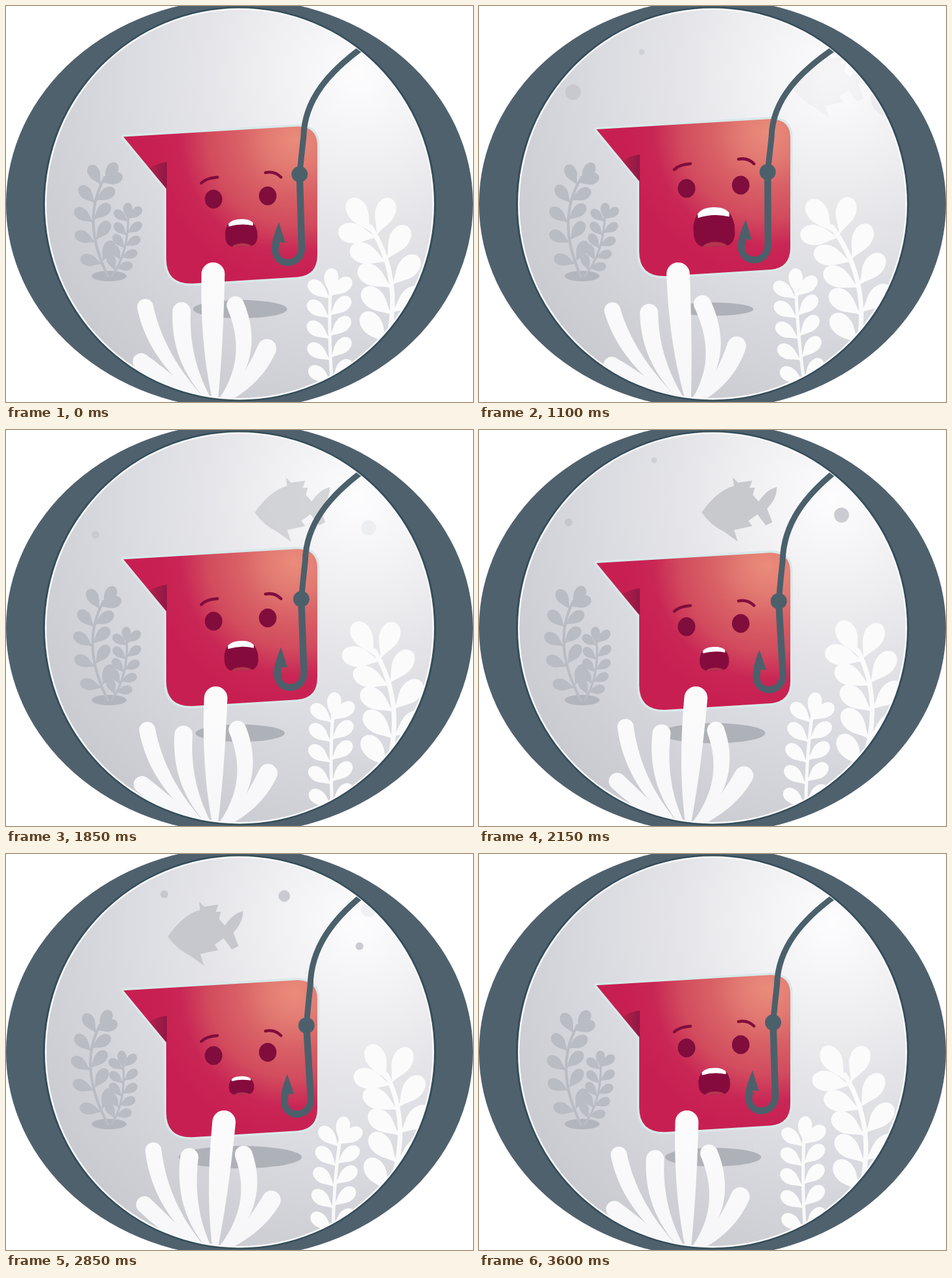
An HTML page with a canvas for the animation above (3.65 s loop, 720 by 610 pixels).

```html
<!DOCTYPE html>
<html lang="en">
<head>
<meta charset="utf-8">
<title>Hooked</title>
<style>
  html, body { margin: 0; width: 100%; height: 100%; overflow: hidden; background: #fff; }
  canvas { display: block; width: 720px; height: 610px; }
</style>
</head>
<body>
<canvas id="stage" width="720" height="610"></canvas>
<script>
const ctx = document.getElementById('stage').getContext('2d');
const LOOP = 3650, STEP = 50;
const SLATE = '#4f616d', HOOK = '#4b606b', WEED = '#b9bcc3', PLUM = '#800d3c';

const clamp = x => Math.max(0, Math.min(1, x));
const mix = (a, b, u) => a + (b - a) * u;
const quad = (a, b, c, u) => mix(mix(a, b, u), mix(b, c, u), u);

// Eases between 1 at time high and 0 at time low, around the loop
function swing(t, high, low, power) {
  const since = (t - high + LOOP) % LOOP, fall = (low - high + LOOP) % LOOP;
  const turn = since < fall ? since / fall : 1 + (since - fall) / (LOOP - fall);
  return ((1 + Math.cos(Math.PI * turn)) / 2) ** power;
}

function fill(path, color) {
  ctx.fillStyle = color;
  ctx.fill(typeof path === 'string' ? new Path2D(path) : path);
}

function line(d, width, color) {
  ctx.lineWidth = width;
  ctx.strokeStyle = color;
  ctx.stroke(new Path2D(d));
}

function oval(x, y, rx, ry, color) {
  ctx.beginPath();
  ctx.ellipse(x, y, rx, ry, 0, 0, 7);
  ctx.fillStyle = color;
  ctx.fill();
}

function spread(gradient, ...colors) {
  colors.forEach((c, i) => gradient.addColorStop(i / (colors.length - 1), c));
  return gradient;
}

const radial = (x, y, r, ...colors) => spread(ctx.createRadialGradient(x, y, 0, x, y, r), ...colors);

const PALE = spread(ctx.createLinearGradient(0, 420, 0, 600), '#fbfbfc', '#f7f7f9');

function group(draw) {
  ctx.save();
  draw();
  ctx.restore();
}

// Drop-shaped leaf, narrow at (x, y) and round at its tip; angle 0 points up
function leaf(x, y, angle, len, w) {
  group(() => {
    ctx.translate(x, y);
    ctx.rotate(angle);
    ctx.scale(w / 2, -len);
    ctx.beginPath();
    ctx.moveTo(0, 0);
    ctx.bezierCurveTo(.3, .25, 1, .4, 1, .65);
    ctx.bezierCurveTo(1, .88, .5, 1, 0, 1);
    ctx.bezierCurveTo(-.5, 1, -1, .88, -1, .65);
    ctx.bezierCurveTo(-1, .4, -.3, .25, 0, 0);
    ctx.fill();
  });
}

// Five pairs of leaves and a top leaf on a curved stem from tip to base
function plant([tx, ty], [cx, cy], [bx, by], sway, len, color) {
  const w = len * .52;
  tx += sway;
  cx += sway / 2;
  line(`M${tx} ${ty}Q${cx} ${cy} ${bx} ${by}`, len * .12, color);
  ctx.fillStyle = color;
  const tilt = u => Math.atan2(mix(tx - cx, cx - bx, u), mix(cy - ty, by - cy, u));
  leaf(tx, ty + 8, tilt(0), len, w);
  for (let u = .09; u < 1; u += .2) {
    const x = quad(tx, cx, bx, u), y = quad(ty, cy, by, u);
    leaf(x, y, tilt(u) - .92, len, w);
    leaf(x, y - 4, tilt(u) + .84, len, w);
  }
}

function backdrop() {
  oval(360, 305, 360, 316, SLATE);
  oval(360, 305, 303, 304, '#354d5a');
  oval(360, 305, 300, 301.5, '#fafbfc');
  oval(360, 305, 297.5, 299, radial(545, 105, 620,
    '#fdfdfe', '#f1f1f4', '#e4e4e8', '#d9dadf', '#cfd0d5', '#c6c7cd'));
}

// x, y and radius at the middle of each short life
const BUBBLES = [
  [600, 632, 174, 28], [850, 145, 149, 12], [1450, 251, 48, 4.5],
  [2150, 138, 142, 6], [2350, 559, 118, 11.5], [2450, 270, 27, 4.5],
  [2850, 244, 62, 6], [2850, 545, 142, 6], [3000, 429, 55, 9]
];

function bubbles(t) {
  BUBBLES.forEach(([mid, x, y, r]) => {
    const age = t - mid;
    ctx.globalAlpha = .85 * clamp((600 - Math.abs(age)) / 400);
    oval(x, y - .065 * age, r, r, '#c3c5cb');
  });
  ctx.globalAlpha = 1;
}

function fish(t) {
  group(() => {
    ctx.globalAlpha = clamp(Math.min((t - 900) / 1300, (3450 - t) / 600));
    ctx.translate(303 - .134 * (t - 2450), 127);
    fill('M0 0Q24 -34 50 -41L48 -54L56 -46L78 -49L74 -38L82 -38L79 -27L88 -17Q101 -36 116 -39'
      + 'Q116 -21 101 -6L109 15L99 20L86 3L72 13L78 21L50 27L56 45L35 30Q14 20 0 0Z', '#c7c8cd');
  });
}

function bubbleBody(dy) {
  group(() => {
    ctx.translate(0, dy);
    const d = 'M181 201L450 185Q480 186 480 214L480 383Q480 414 450 417L287 427Q247 428 247 389L247 281Z';
    line(d, 7, '#d9e8e9');
    fill(d, radial(445, 205, 220, '#ea8c7b', '#e27a72', '#d85f65', '#d24c5e', '#c92655', '#c81f52'));
    fill('M221 249Q232 242 248 240L248 281Z',
      spread(ctx.createLinearGradient(222, 0, 250, 0), '#b21f4c', '#8c1843'));
  });
}

function face(f) {
  group(() => {
    ctx.translate(0, f * 1.25);
    line('M301 272Q309 264 326 263', 4.5, PLUM);
    line('M400 256Q414 253 424 263', 4.5, PLUM);
  });
  oval(320, 297 + f, 13.5, 14.5, PLUM);
  oval(403.5, 292 + f, 13.5, 14.5, PLUM);

  // The mouth opens upward from a steady lower lip
  group(() => {
    ctx.translate(363.5, 370.5);
    ctx.rotate(-.04);
    ctx.scale(1 - f * .017, 1 - f * .0255);
    const mouth = new Path2D('M-25 -23C-22 -35 -18 -43 0 -43C18 -43 22 -35 25 -23L25 -13Q23 0 11 0L-11 0Q-23 0 -25 -13Z');
    fill(mouth, '#860b3d');
    ctx.clip(mouth);
    oval(0, 2, 16, 7, '#b5364f');
    fill('M-20 -50L20 -50L19 -32Q0 -37 -19 -32Z', '#fff');
  });
}

function hook(dx) {
  const x = 450 + dx, y = 258 + dx * .47;
  line(`M548 65C${499 + dx * .5} 100 ${457 + dx} 143 ${456 + dx} 202Q${453 + dx} 228 ${x} ${y}`, 9, HOOK);
  oval(x, y, 12.5, 12.5, HOOK);
  group(() => {
    ctx.translate(x, y);
    ctx.rotate(-.02 - dx * .003);
    line('M0 0L0 112C0 142 -40 143 -41 116L-39 104', 10.5, HOOK);
    fill('M-34 73L-25 105L-35 103Q-38 112 -36 120L-46 116Q-48 103 -34 73Z', HOOK);
  });
}

// Tip, bend and radius of each coral finger
const FINGERS = [
  [209, 547, 252, 13], [216, 463, 232, 12.5], [272, 470, 268, 14],
  [321, 413, 318, 18], [355, 461, 388, 13.5], [403, 528, 384, 14.5]
];

function coral(c) {
  ctx.fillStyle = PALE;
  FINGERS.forEach(([x, y, bend, r], i) => {
    const reach = (606 - y) / 193;
    const tx = x + c * reach, ty = y + c * (x - 321) * .004;
    const cx = bend + c * reach / 2, cy = mix(y, 606, .55);
    ctx.beginPath();
    for (let u = 0; u <= 1; u += .01) {
      const px = quad(tx, cx, 294 + 9.5 * i, u), py = quad(ty, cy, 606, u);
      const pr = r * (1 - .75 * u * u);
      ctx.moveTo(px + pr, py);
      ctx.arc(px, py, pr, 0, 7);
    }
    ctx.fill();
  });
}

function draw(t) {
  const sway = swing(t, 2450, 1100, 1.25), bob = swing(t, 2700, 1100, 1);
  const lift = mix(-11, 9.5, bob), lean = mix(5, -10, sway);
  ctx.clearRect(0, 0, 720, 610);
  ctx.lineCap = ctx.lineJoin = 'round';
  backdrop();
  group(() => {
    ctx.beginPath();
    ctx.ellipse(360, 305, 299, 300.5, 0, 0, 7);
    ctx.clip();
    bubbles(t);
    fish(t);
    oval(159, 416, 27, 8, '#b2b5bd');
    plant([153, 264], [115, 330], [157, 416], lean, 35, WEED);
    plant([189, 322], [190, 380], [163, 416], lean, 27, WEED);
    oval(361, 467, mix(62, 96, bob * bob), 14 + lift * .35, '#aeb2b8');
    bubbleBody(lift);
    face(lift * 1.45);
    hook(mix(-5, 15, sway));
    coral(mix(-14, 18, sway));
    plant([560, 340], [618, 430], [580, 545], mix(-16, 31, sway), 60, PALE);
    plant([497, 438], [495, 510], [504, 600], mix(-8, 21, sway), 42, PALE);
  });
}

const begin = performance.now();
function tick() {
  const t = (performance.now() - begin) % LOOP;
  draw(Math.floor(t / STEP) * STEP);
  requestAnimationFrame(tick);
}
tick();
</script>
</body>
</html>
```
